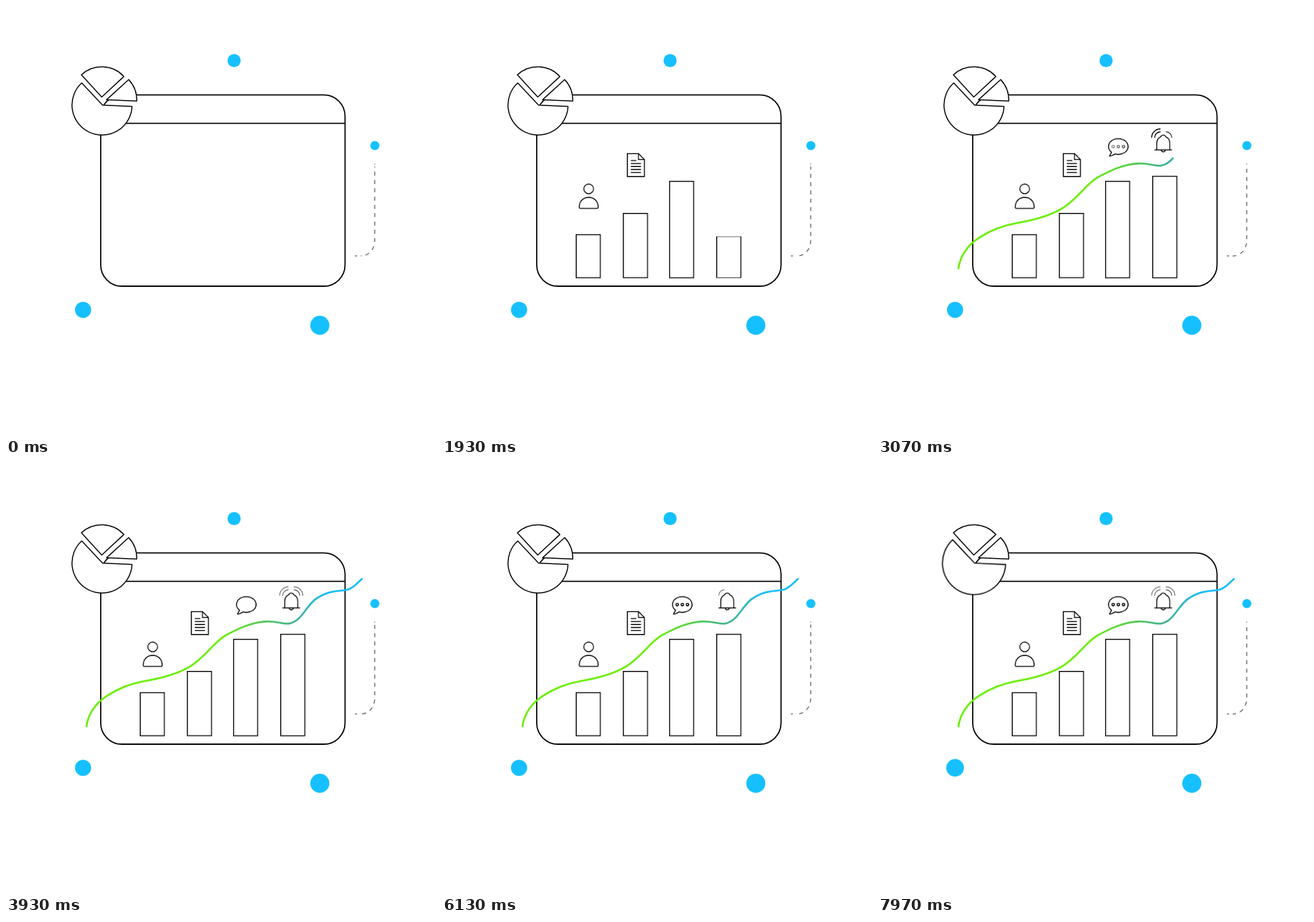
An HTML page that plays this animation: 640x640 px, repeating every 8000 ms.

```html
<!DOCTYPE html>
<html lang="en">
<head>
<meta charset="utf-8">
<title>Growing chart</title>
<style>
html, body { margin: 0; width: 100%; height: 100%; overflow: hidden; background: #fff; }
svg { display: block; width: 100vw; height: 100vh; }
.ink { fill: none; stroke: #000; stroke-width: 1.4; stroke-linejoin: round; stroke-linecap: round; }
.solid { fill: #fff; }
.dot { fill: #16c0ff; }
.bar, .icon, .dot { transform-box: fill-box; transform-origin: center; }
.bar { transform-origin: bottom; stroke-linejoin: miter; }
.slice { transform-box: view-box; transform-origin: 143.5px 147.7px; }
.dashes { stroke: #666; stroke-linecap: butt; }
.flow { stroke-dasharray: 6 6.35; }
.trend { fill: none; stroke: url(#fade); stroke-width: 2.8; stroke-linecap: round; stroke-dasharray: 1 2; }

.bar, .icon, .dot, .slice, .flow, .trend, .wave, .chat {
  animation: var(--a, none) 8s infinite ease-in-out;
}
.flow { animation: flow 8s infinite linear; }

/* bars and icons: grow past full size, then settle */
@keyframes bar1 { 0%, 7.31% { transform: scaleY(0) } 11.48% { transform: scaleY(1.1) } 13.87%, 100% { transform: none } }
@keyframes bar2 { 0%, 12.34% { transform: scaleY(0) } 16.5% { transform: scaleY(1.1) } 18.9%, 100% { transform: none } }
@keyframes bar3 { 0%, 17.35% { transform: scaleY(0) } 21.5% { transform: scaleY(1.1) } 23.85%, 100% { transform: none } }
@keyframes bar4 { 0%, 22.38% { transform: scaleY(0) } 26.54% { transform: scaleY(1.1) } 28.94%, 100% { transform: none } }
@keyframes icon1 { 0%, 14.25% { transform: scale(0) } 16.25% { transform: scale(1.2) } 18.38%, 100% { transform: none } }
@keyframes icon2 { 0%, 19.28% { transform: scale(0) } 21.28% { transform: scale(1.2) } 23.4%, 100% { transform: none } }
@keyframes icon3 { 0%, 24.31% { transform: scale(0) } 26.31% { transform: scale(1.2) } 28.44%, 100% { transform: none } }
@keyframes icon4 { 0%, 29.34% { transform: scale(0) } 31.34% { transform: scale(1.2) } 33.46%, 100% { transform: none } }

/* pulses */
@keyframes top {
  0%, 4.4%, 11.9%, 77%, 83.9%, 100% { transform: none }
  8.1%, 80.4% { transform: scale(1.25) }
}
@keyframes left {
  0%, 38.6%, 46.1% { transform: none }
  42.4% { transform: scale(1.25) }
  98% { transform: none; animation-timing-function: ease-in }
  100% { transform: scale(1.136) }
}
@keyframes low { 0%, 64.6%, 72.1%, 100% { transform: none } 68.4% { transform: scale(1.25) } }
@keyframes slice {
  0%, 98% { transform: none; animation-timing-function: ease-in }
  100% { transform: scale(1.072) }
}

@keyframes trend { 0%, 26.6% { stroke-dashoffset: 1.02 } 44.1%, 100% { stroke-dashoffset: 0 } }
@keyframes flow { from { stroke-dashoffset: 5 } to { stroke-dashoffset: -135.3 } }

/* speech dots */
@keyframes chat1 { 0%, 36.5% { opacity: 1 } 40%, 57.5% { opacity: 0 } 60.5%, 100% { opacity: 1 } }
@keyframes chat2 { 0%, 36.8% { opacity: 1 } 40.2%, 60.6% { opacity: 0 } 64%, 100% { opacity: 1 } }
@keyframes chat3 { 0%, 37% { opacity: 1 } 40.4%, 63.8% { opacity: 0 } 67%, 100% { opacity: 1 } }

/* bell waves */
@keyframes wave1 { 0%, 33.5% { opacity: 0 } 35.5%, 44% { opacity: 1 } 50%, 73.8% { opacity: .45 } 76%, 78% { opacity: 0 } 82%, 100% { opacity: .45 } }
@keyframes wave2 { 0%, 35% { opacity: 0 } 37%, 44% { opacity: 1 } 50%, 76% { opacity: .5 } 79% { opacity: 0 } 82.5%, 100% { opacity: .5 } }
@keyframes wave3 { 0%, 37.2% { opacity: 0 } 39%, 44% { opacity: 1 } 50%, 74% { opacity: .6 } 77%, 79% { opacity: 0 } 83%, 100% { opacity: .6 } }
@keyframes wave4 { 0%, 38.7% { opacity: 0 } 40.5%, 44% { opacity: 1 } 50%, 74% { opacity: .5 } 77.2%, 79.5% { opacity: 0 } 83.5%, 100% { opacity: .5 } }
</style>
</head>
<body>
<svg viewBox="0 0 640 640">
  <defs>
    <linearGradient id="fade" gradientUnits="userSpaceOnUse" x1="120" y1="0" x2="530" y2="0">
      <stop offset=".48" stop-color="#6cee08"/>
      <stop offset=".75" stop-color="#42b190"/>
      <stop offset=".88" stop-color="#18bcff"/>
    </linearGradient>
  </defs>

  <g class="ink" stroke-width="1.8" style="stroke-width:1.8">
    <rect x="141" y="132.4" width="363.6" height="284.6" rx="31.5"/>
    <path d="M141 174.7H504.6" stroke-linecap="butt"/>
  </g>

  <g class="ink solid" style="stroke-width:1.5">
    <path class="slice" style="--a:slice" d="M112.7 114.5L143.7 147.5L187.6 149.5A44.7 44.7 0 1 1 112.7 114.5Z"/>
    <path d="M112.3 102.4L142.5 135.5L175.5 104.9A44.8 44.8 0 0 0 112.3 102.4Z"/>
    <path d="M149.6 139.6L182.6 109.5A44.8 44.8 0 0 1 194.6 141.5Z"/>
  </g>

  <g class="ink">
    <rect class="bar" style="--a:bar1" x="199.7" y="340.3" width="36" height="64.1"/>
    <rect class="bar" style="--a:bar2" x="269.9" y="308.7" width="36" height="95.7"/>
    <rect class="bar" style="--a:bar3" x="338.6" y="261" width="36" height="143.4"/>
    <rect class="bar" style="--a:bar4" x="408.8" y="253.4" width="36" height="151"/>
  </g>

  <path class="trend" style="--a:trend" pathLength="1" d="M119.7 390.5C122 374 132 356 152 344C172 331 190 326 205 323.3C225 320 250 315 272 302.5C297 288 308 266 327 255C345 245.5 365 235.5 386 234.5C405 233.5 412 239 422 237.3C440 234 446 212 461 201C476 190 490 189 505 187.7C514 187 522 178 529.7 171"/>

  <g class="ink">
    <g class="icon" style="--a:icon1">
      <circle cx="218.3" cy="272.2" r="7.2"/>
      <path d="M206 301.2q-1.8 0-1.8-1.8C204.2 291 210 284.8 218.3 284.8S232.5 291 232.5 299.4q0 1.8-1.8 1.8Z"/>
    </g>
    <g class="icon" style="--a:icon2">
      <path d="M275.8 219.5H292.3L301.2 228.4V253.8H275.8ZM292.3 219.5V228.4H301.2"/>
      <path d="M281.5 230H288.8M281.5 234.3H295.5M281.5 238.8H295.5M281.5 243.3H295.5M281.5 247.8H295.5"/>
    </g>
    <g class="icon" style="--a:icon3">
      <path d="M347.6 217.6L344.5 223.6Q349 222.8 353 220.2A14.6 11.7 0 1 0 347.6 217.6Z"/>
      <circle class="chat" style="--a:chat1" cx="350" cy="209.2" r="1.9"/>
      <circle class="chat" style="--a:chat2" cx="357.7" cy="209.2" r="1.9"/>
      <circle class="chat" style="--a:chat3" cx="365.3" cy="209.2" r="1.9"/>
    </g>
    <g class="icon" style="--a:icon4">
      <path d="M412 214.2H437M414.9 214.2V204.5C414.9 198.5 418 195.8 420.8 194.8A3.8 3.6 0 0 1 428.2 194.8C431 195.8 434.2 198.5 434.2 204.5V214.2"/>
      <path d="M421.6 214.4A2.9 2.6 0 0 0 427.4 214.4"/>
    </g>
    <path class="wave" style="--a:wave1" d="M407.3 195.5C407.3 189 413 183.2 420 183"/>
    <path class="wave" style="--a:wave2" d="M411.9 195.5C412 191 415.5 187.5 420 187.3"/>
    <path class="wave" style="--a:wave3" d="M429 187.3C433.5 187.5 437 191 437.2 195.5"/>
    <path class="wave" style="--a:wave4" d="M429 183C436 183.2 441.8 189 441.8 195.5"/>
  </g>

  <g class="ink dashes">
    <path d="M519.3 372H522.4"/>
    <path d="M548.8 234V236.3" stroke-opacity=".5"/>
    <path class="flow" d="M528 372H529A19.8 23 0 0 0 548.8 349V239"/>
  </g>

  <circle class="dot" style="--a:top" cx="339.5" cy="81.2" r="9.8"/>
  <circle class="dot" cx="549" cy="207.8" r="6.8"/>
  <circle class="dot" style="--a:left" cx="114.7" cy="452.2" r="12"/>
  <circle class="dot" style="--a:low" cx="467.1" cy="475.3" r="14.2"/>
</svg>
</body>
</html>
```
